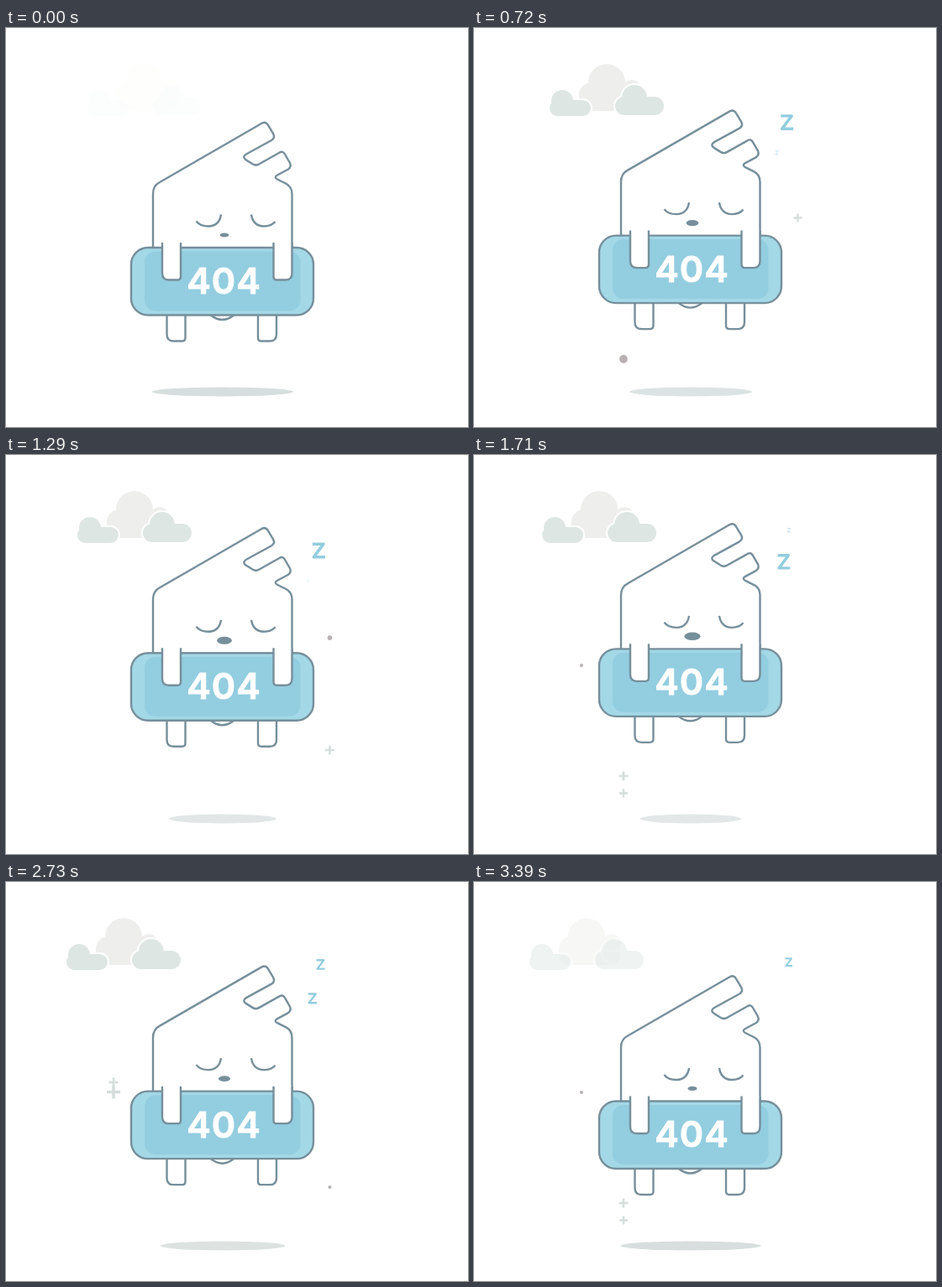
Animation, 550 px wide and 476 px high, one loop 3.42 s. Source, as an HTML page with a canvas:

```html
<!DOCTYPE html>
<html lang="en">
<head>
<meta charset="utf-8">
<title>404</title>
<style>
  html, body { margin: 0; width: 100%; height: 100%; overflow: hidden; background: #fff; }
  canvas { display: block; }
</style>
</head>
<body>
<canvas width="550" height="476"></canvas>
<script>
const ctx = document.querySelector('canvas').getContext('2d');
const LOOP = 3420, PEAK = 1620, RISE = 32.3;
const LINE = '#768f9b', BLUE = '#93cde0';
const clamp = v => Math.max(0, Math.min(1, v));

const body = new Path2D(`M175 262V198Q175 188 183 184L304 114Q309 111 312 116L318 126
  Q321 131 316 134L286 150.5Q280.500 154 286 157.500L294 162.500Q297.500 164.500 301 162.500
  L325 149Q329.500 146 332 150.500L338 161Q340 165.500 336 168.500L323 175.500
  Q318.500 178 323 180.500L334 186Q340.500 190 340.500 198V262`);
const eyes = new Path2D(`M226.500 230.500Q231 236.500 241 236.500Q254 236 256 222.500
  M292 222.500Q294 236 307 236.500Q316 236.500 320.500 231`);
const tail = new Path2D('M243 342Q257.500 354 272 342');

// Bumps are [x, y, radius]; base is [x, y, width, height, radius].
function makeCloud(base, ...bumps) {
  const path = new Path2D();
  path.roundRect(...base);
  for (const [x, y, r] of bumps) {
    path.moveTo(x + r, y);
    path.arc(x, y, r, 0, 7);
  }
  return path;
}
const clouds = [
  [makeCloud([125, 71, 73, 28, 12], [158, 65, 22], [140, 80, 15], [188, 73, 11]), '#eeeeed'],
  [makeCloud([90, 86, 49, 19, 9.5], [105, 87, 13]), '#dee6e4'],
  [makeCloud([168, 82, 58, 22, 11], [191, 83, 15]), '#dee6e4']
];

function ellipse(x, y, rx, ry, color) {
  ctx.fillStyle = color;
  ctx.beginPath();
  ctx.ellipse(x, y, rx, ry, 0, 0, 7);
  ctx.fill();
}

function box(x, y, w, h, r, color) {
  ctx.fillStyle = color;
  ctx.beginPath();
  ctx.roundRect(x, y, w, h, r);
  ctx.fill();
}

function outline(path) {
  ctx.fillStyle = '#fff';
  ctx.fill(path);
  ctx.stroke(path);
}

function limb(x, y, length, side) {
  outline(new Path2D(`M${x} ${y}v${length - 8}q0 8 ${8 * side} 8h${10 * side}
    q${4 * side} 0 ${4 * side} -4v${4 - length}`));
}

function drawClouds(t) {
  ctx.save();
  ctx.globalAlpha = Math.min(clamp(0.1 + t / 350), clamp((3550 - t) / 320));
  ctx.translate(6.5 - 0.009 * t, 0);
  ctx.strokeStyle = '#fff';
  ctx.lineWidth = 4;
  for (const [path, color] of clouds) {
    ctx.stroke(path);
    ctx.fillStyle = color;
    ctx.fill(path);
  }
  ctx.restore();
}

function drawZ(t, start, cycles) {
  const turns = (t - start) / 1200;
  if (turns < 0 || turns >= cycles) return;
  const p = turns % 1;
  const q = (p + (1 - Math.cos(Math.PI * p)) / 2) / 2;
  const size = Math.sin(Math.PI * q) ** 0.75;
  ctx.save();
  ctx.translate(359 + 16 * (1 - (1 - q) ** 2), 152 - 66 * q);
  ctx.scale(size, size);
  ctx.globalAlpha = clamp(size * 2.2);
  ctx.strokeStyle = BLUE;
  ctx.lineWidth = 3.6;
  ctx.stroke(new Path2D('M-7.500 -8H6L-6 8H8'));
  ctx.restore();
}

function plus(x, y, size) {
  const r = size / 2;
  ctx.strokeStyle = '#d6dddc';
  ctx.lineWidth = size / 5 + 0.4;
  ctx.stroke(new Path2D(`M${x - r} ${y}h${size}M${x} ${y - r}v${size}`));
}

// A growing dot, then a plus in the middle, above and below.
function drawSparkle(t, x, y, start) {
  if (t < start) return;
  const age = (t - start) % 840;
  if (age < 150) ellipse(x, y, 1.5 + age * 0.026, 1.5 + age * 0.026, '#b8b1b1');
  if (age >= 150 && age < 215) plus(x, y - 0.5, 16);
  if (age >= 195 && age < 300) plus(x, y - 12, 11);
  if (age >= 265 && age < 360) plus(x, y + 8.5, 10);
}

function drawCharacter(h) {
  ctx.save();
  ctx.translate(0, -RISE * h);
  ctx.strokeStyle = LINE;
  ctx.lineWidth = 2.4;
  limb(191.5, 342, 31.5, 1);
  limb(322, 342, 31.5, -1);
  outline(tail);
  outline(body);
  ctx.stroke(eyes);
  ellipse(260, 247, 5.4 + 4.4 * h, 2.6 + 2.3 * h, LINE);
  box(149, 262, 217, 80.5, 20, '#a3d8e6');
  ctx.stroke();
  box(165, 266.5, 185.5, 71, 13, BLUE);
  limb(186, 256, 44.5, 1);
  limb(340.5, 256, 44.5, -1);
  ctx.font = '600 43px Inter, Lato, sans-serif';
  ctx.textAlign = 'center';
  ctx.fillStyle = ctx.strokeStyle = '#fff';
  ctx.lineWidth = 1;
  ctx.letterSpacing = '1px';
  ctx.fillText('404', 259.5, 317);
  ctx.strokeText('404', 259.5, 317);
  ctx.restore();
}

function draw() {
  const t = performance.now() % LOOP;
  const h = t < PEAK ? t / PEAK : (LOOP - t) / (LOOP - PEAK);
  ctx.clearRect(0, 0, 550, 476);
  ctx.lineJoin = 'round';
  const shade = 216 + 12 * h;
  ellipse(258, 434, 84 - 25 * h, 5.5, `rgb(${shade} ${shade + 6 - 2 * h} ${shade + 5 - h})`);
  drawClouds(t);
  drawZ(t, 30, 3);
  drawZ(t, 620, 2);
  drawSparkle(t, 128, 251, 10);
  drawSparkle(t, 385.5, 364, 190);
  drawSparkle(t, 385.5, 218, 400);
  drawSparkle(t, 178, 395, 590);
  drawCharacter(h);
  requestAnimationFrame(draw);
}
draw();
</script>
</body>
</html>
```
